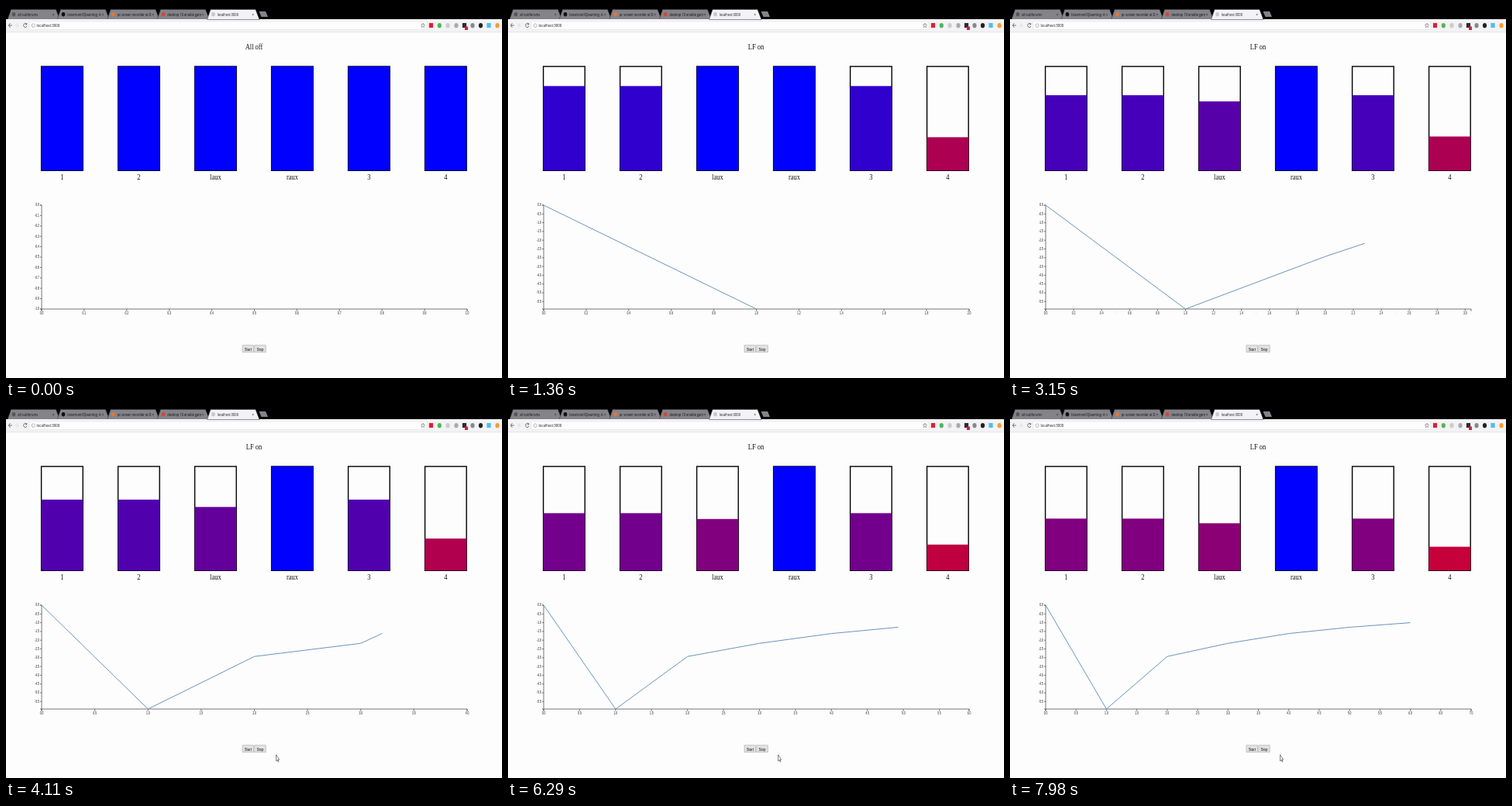
Write an HTML page that moves like this. It is 640 px wide and 480 px high and loops after 8 s.

```html
<!DOCTYPE html>
<html lang="en">
<head>
<meta charset="utf-8">
<title>Muscle activity</title>
<style>
  html, body { margin: 0; width: 100%; height: 100%; overflow: hidden; background: #fdfdfd; }
  svg { display: block; width: 100%; height: 100%; }
  text { fill: #111; }
  .serif { font: 11.3px "Liberation Serif", serif; text-anchor: middle; }
  .tick { font: 4.5px "Liberation Sans", sans-serif; }
  .ui { font: 5.4px "Open Sans", sans-serif; }
  .button { font: 5.9px "Liberation Sans", sans-serif; text-anchor: middle; }
  .axis { fill: none; stroke: #555; stroke-width: .8; }
</style>
</head>
<body>
<svg viewBox="0 0 640 480" preserveAspectRatio="none">
  <g id="chrome"></g>
  <g id="bars"></g>
  <g id="plot"></g>
  <g id="controls"></g>
  <path id="cursor" d="M348.6 450v8.2l1.5-1.6 1 2.6 .9-.5-1-2.4h1.7z" fill="#fff" stroke="#333" stroke-width=".6"/>
</svg>
<script>
const LOOP = 8000, LINE_MS = 1000, BAR_MS = 500;
const LEFT = 46, WIDTH = 549, TOP = 257, HEIGHT = 134;
const BAR_BOTTOM = 212.3, BAR_FULL = 134.3;
const LABELS = ['1', '2', 'laux', 'raux', '3', '4'];

// start time, line value, height of bars 1/2/3, of laux, of 4
const STEPS = [
  [-2000, 0, 134.3, 134.3, 134.3],
  [80, 5.93, 109, 134.3, 43],
  [1450, 2.93, 101.8, 95, 46],
  [2910, 2.18, 91.5, 82, 41.3],
  [4090, 1.62, 82.5, 73.7, 37],
  [5555, 1.26, 74, 66.5, 33.5],
  [6790, 1, 67, 61, 30.7]
];

const $ = id => document.getElementById(id);
const lerp = (a, b, p) => a + (b - a) * p;
const ease = t => t < .5 ? 4 * t ** 3 : 1 - 4 * (1 - t) ** 3;
const progress = (t, ms) => ease(Math.min(1, Math.max(0, t / ms)));

// The 16:9 page is shown on a 4:3 stage, so all type is narrowed alike.
const text = (x, y, s, cls, extra = '') =>
  `<text class="${cls}" transform="translate(${x} ${y}) scale(.75 1)" ${extra}>${s}</text>`;
const rect = (x, y, w, h, fill, extra = '') =>
  `<rect x="${x}" y="${y}" width="${w}" height="${h}" fill="${fill}" ${extra}/>`;
const dot = (x, y, fill, r = 2.6) =>
  `<ellipse cx="${x}" cy="${y}" rx="${r}" ry="${r * 1.2}" fill="${fill}"/>`;

function drawChrome() {
  const tab = (x, title, icon, fill) =>
    `<path d="M${x} 17.5l4.5-13h58l5 13z" fill="${fill}" stroke="#333" stroke-width=".5"/>` +
    dot(x + 8, 10.8, icon, 2.3) + text(x + 13.2, 12.8, title, 'ui') +
    text(x + 58, 12.8, '×', 'ui');
  const grey = '#85838a', pale = '#f3f2f4';
  const tools = [
    ['548.5', '#e02030', 1], ['559.3', '#4db858'], ['570', '#ccc'], ['581', '#aaa'],
    ['591.5', '#2d2d30', 1], ['602', '#88888c'], ['612.5', '#222'], ['623', '#48bff0', 1], ['634', '#f0a030']
  ];
  $('chrome').innerHTML =
    rect(0, 0, 640, 18, '#000') +
    tab(2, 'all subforums', '#55555c', grey) +
    tab(66, 'braxmont/Qlearning: A', '#111', grey) +
    tab(130.5, 'pc screen recorder at D', '#e07838', grey) +
    tab(195, 'desktop 10 enable gam', '#d04838', grey) +
    rect(0, 17, 640, 17, pale) +
    tab(259.5, 'localhost:3000', '#c8c8cc', pale) +
    `<path d="M326.5 7h8.5l3 7h-8.5z" fill="${grey}"/>` +
    rect(30, 20, 513, 10.5, '#fdfdfd', 'stroke="#ddd" stroke-width=".5"') +
    '<path d="M0 33.7H640" stroke="#ddd" stroke-width=".7"/>' +
    '<path d="M8 25H3.5m2-2.8L3.5 25l2 2.8M26.5 23.2a2.2 2.6 0 1 0 .4 2.8m-.2-4v2h-1.8" fill="none" stroke="#555" stroke-width=".8"/>' +
    '<path d="M12 25h4m-1.8-2.6L16 25l-1.8 2.6" fill="none" stroke="#d4d4d4" stroke-width=".7"/>' +
    '<ellipse cx="35.2" cy="25.2" rx="1.9" ry="2.4" fill="none" stroke="#777" stroke-width=".5"/>' +
    text(39.5, 27.2, 'localhost:3000', 'ui', 'style="font-size:5.9px"') +
    '<path d="M538 22l.7 2.1h1.9l-1.5 1.4.6 2.2-1.7-1.3-1.7 1.3.6-2.2-1.5-1.4h1.9z" fill="none" stroke="#555" stroke-width=".5"/>' +
    tools.map(([x, c, square]) => square ? rect(x - 2.6, 22, 5.2, 6, c) : dot(x, 25.2, c)).join('') +
    rect(592, 26.5, 4, 4.5, '#d8203c');
}

function drawControls() {
  const button = (x, w, s) =>
    rect(x, 437.8, w, 9, '#e2e2e2', 'stroke="#aaa" stroke-width=".6"') +
    text(x + w / 2, 444.5, s, 'button');
  $('controls').innerHTML = button(305, 14.6, 'Start') + button(320.8, 14.4, 'Stop');
}

function drawBars(heights, title) {
  $('bars').innerHTML = text(320, 55.8, title, 'serif') + LABELS.map((label, i) => {
    const x = 45.6 + 99 * i, h = heights[i], k = h / BAR_FULL;
    const fill = `rgb(${Math.round(255 * (1 - k))},0,${Math.round(255 * k)})`;
    return rect(x, 78, 53.6, BAR_FULL, 'none', 'stroke="#000" stroke-width="1.4"') +
      rect(x, BAR_BOTTOM - h, 53.6, h, fill) +
      text(x + 26.8, 223.7, label, 'serif');
  }).join('');
}

function tickValues(max) {
  const step = max <= 1 ? .1 : max <= 3 ? .2 : .5;
  return Array.from({ length: Math.floor(max / step + 1e-6) + 1 }, (_, i) => (i * step).toFixed(1));
}

// Ticks slide from the old scale to the new one while they fade in or out.
function ticks(from, to, p, draw) {
  const old = tickValues(from), next = tickValues(to);
  return [...new Set([...old, ...next])].map(v => {
    const pos = +v === to ? Math.min(1, lerp(v / from, v / to, p)) : lerp(v / from, v / to, p);
    const alpha = !old.includes(v) ? p : !next.includes(v) ? 1 - p : 1;
    return pos > 1.002 || alpha < .01 ? '' : `<g opacity="${alpha.toFixed(3)}">${draw(v, pos)}</g>`;
  }).join('');
}

function drawPlot(n, p) {
  const fromX = Math.max(1, n), toX = n + 1;
  const fromY = n > 1 ? 5.93 : 1, toY = n ? 5.93 : 1;
  const right = LEFT + WIDTH, bottom = TOP + HEIGHT;
  const xTicks = ticks(fromX, toX, p, (v, k) => {
    const x = LEFT + k * WIDTH;
    return `<path class="axis" d="M${x} ${bottom}v2.7"/>` + text(x, bottom + 7.2, v, 'tick', 'text-anchor="middle"');
  });
  const yTicks = ticks(fromY, toY, p, (v, k) => {
    const y = TOP + k * HEIGHT;
    return `<path class="axis" d="M${LEFT} ${y}h-2"/>` +
      text(LEFT - 3, y + 1.45, +v ? '-' + v : v, 'tick', 'text-anchor="end"');
  });
  const points = STEPS.slice(0, n + 1).map(([, value], i) => {
    const k = i === n ? i / toX : lerp(i / fromX, i / toX, p);
    return `${LEFT + k * WIDTH},${TOP + value / toY * HEIGHT}`;
  });
  $('plot').innerHTML = xTicks + yTicks +
    `<path class="axis" d="M${LEFT} ${bottom + 2.7}V${bottom}H${right}v2.7M${LEFT - 2} ${TOP}h2V${bottom}h-2"/>` +
    `<polyline points="${points.join(' ')}" fill="none" stroke="#6c93bc" stroke-width="1"/>`;
}

function render(t) {
  const n = STEPS.findLastIndex(([start]) => t >= start);
  const [start, , ...goal] = STEPS[n];
  const before = STEPS[Math.max(0, n - 1)].slice(2);
  const p = progress(t - start, BAR_MS);
  const [main, laux, last] = goal.map((h, i) => lerp(before[i], h, p));
  drawBars([main, main, laux, BAR_FULL, main, last], n ? 'LF on' : 'All off');
  drawPlot(n, progress(t - start, LINE_MS));
  $('cursor').style.display = t < 3500 ? 'none' : '';
}

drawChrome();
drawControls();
const origin = performance.now();
function loop() {
  render((performance.now() - origin) % LOOP);
  requestAnimationFrame(loop);
}
loop();
</script>
</body>
</html>
```
